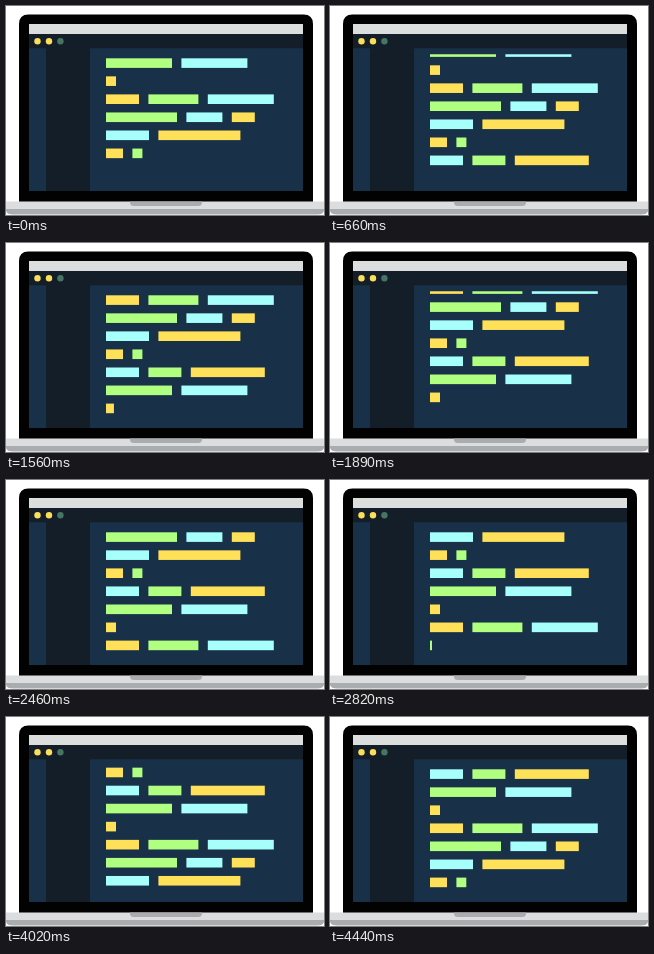
These frames come from a looping animation (318x209 px, 4.5 s). An HTML page:

```html
<!DOCTYPE html>
<html lang="en">
<head>
<meta charset="utf-8">
<title>Laptop typing code</title>
<style>
  html, body { margin: 0; width: 100%; height: 100%; overflow: hidden; background: #fff; }
  svg { display: block; width: 318px; height: 209px; }
</style>
</head>
<body>
<svg viewBox="0 0 318 209">
  <clipPath id="page"><rect x="84" y="48.3" width="213" height="136"/></clipPath>
  <path d="M13 196V18q0-9.5 9.5-9.5h275q9.5 0 9.5 9.5v178z" fill="#020203"/>
  <rect x="23" y="18" width="274" height="167" fill="#193148"/>
  <rect x="23" y="18" width="274" height="10" fill="#dcdddd"/>
  <rect x="23" y="28" width="274" height="14.3" fill="#131e28"/>
  <rect x="40" y="42" width="44" height="143" fill="#131e28"/>
  <circle cx="31.5" cy="35.2" r="3.2" fill="#fbdf58"/>
  <circle cx="43" cy="35.2" r="3.2" fill="#fbdf58"/>
  <circle cx="54.4" cy="35.2" r="3.2" fill="#477565"/>
  <rect y="195.5" width="318" height="8" fill="#dbdddf"/>
  <path d="M0 203H318V205q-1 3.5-7 3.5H7q-6 0-7-3.5z" fill="#a9adb0"/>
  <path d="M124 195.5h72v1q0 3.5-4 3.5h-64q-4 0-4-3.5z" fill="#a9adb0"/>
  <g clip-path="url(#page)"><g id="code"></g></g>
</svg>
<script>
const LOOP = 4500, SEGMENT = 150, SCROLL = 167;
const LEFT = 100, TOP = 52.3, PITCH = 18.05, GAP = 9.4;
const colors = { y: '#ffe058', g: '#b0ff80', c: '#a6fffb' };
const pattern = [
  'g66 c66', 'y10', 'y33 g50 c66', 'g71 c36 y23',
  'c43 y82', 'y17 g10', 'c33 g33 y74'
];
// When each new line starts typing, and when the page then scrolls up
const typeAt = [15, 745, 1455, 1975, 2806, 3535, 4150];
const scrollAt = [565, 1277, 1795, 2600, 3355, 3990];
const FIRST = 6; // lines already on the page at the start

const code = document.getElementById('code');
const ease = s => (s = Math.min(1, Math.max(0, s)), s * s * (3 - 2 * s));
const typed = [];

for (let row = 0; row < FIRST + typeAt.length; row++) {
  let x = LEFT;
  pattern[row % pattern.length].split(' ').forEach((token, i) => {
    const width = +token.slice(1);
    const bar = document.createElementNS('http://www.w3.org/2000/svg', 'rect');
    const attrs = { x, y: TOP + row * PITCH, width, height: 9.6, fill: colors[token[0]] };
    for (const name in attrs) bar.setAttribute(name, attrs[name]);
    code.append(bar);
    if (row >= FIRST) typed.push({ bar, width, start: typeAt[row - FIRST] + i * SEGMENT });
    x += width + GAP;
  });
}

function draw(now) {
  const t = now % LOOP;
  for (const { bar, width, start } of typed)
    bar.setAttribute('width', width * ease((t - start) / SEGMENT));
  const rows = scrollAt.reduce((sum, start) => sum + ease((t - start) / SCROLL), 0);
  code.setAttribute('transform', `translate(0 ${-rows * PITCH})`);
}

const begin = performance.now();
function tick() {
  draw(performance.now() - begin);
  requestAnimationFrame(tick);
}
tick();
</script>
</body>
</html>
```
